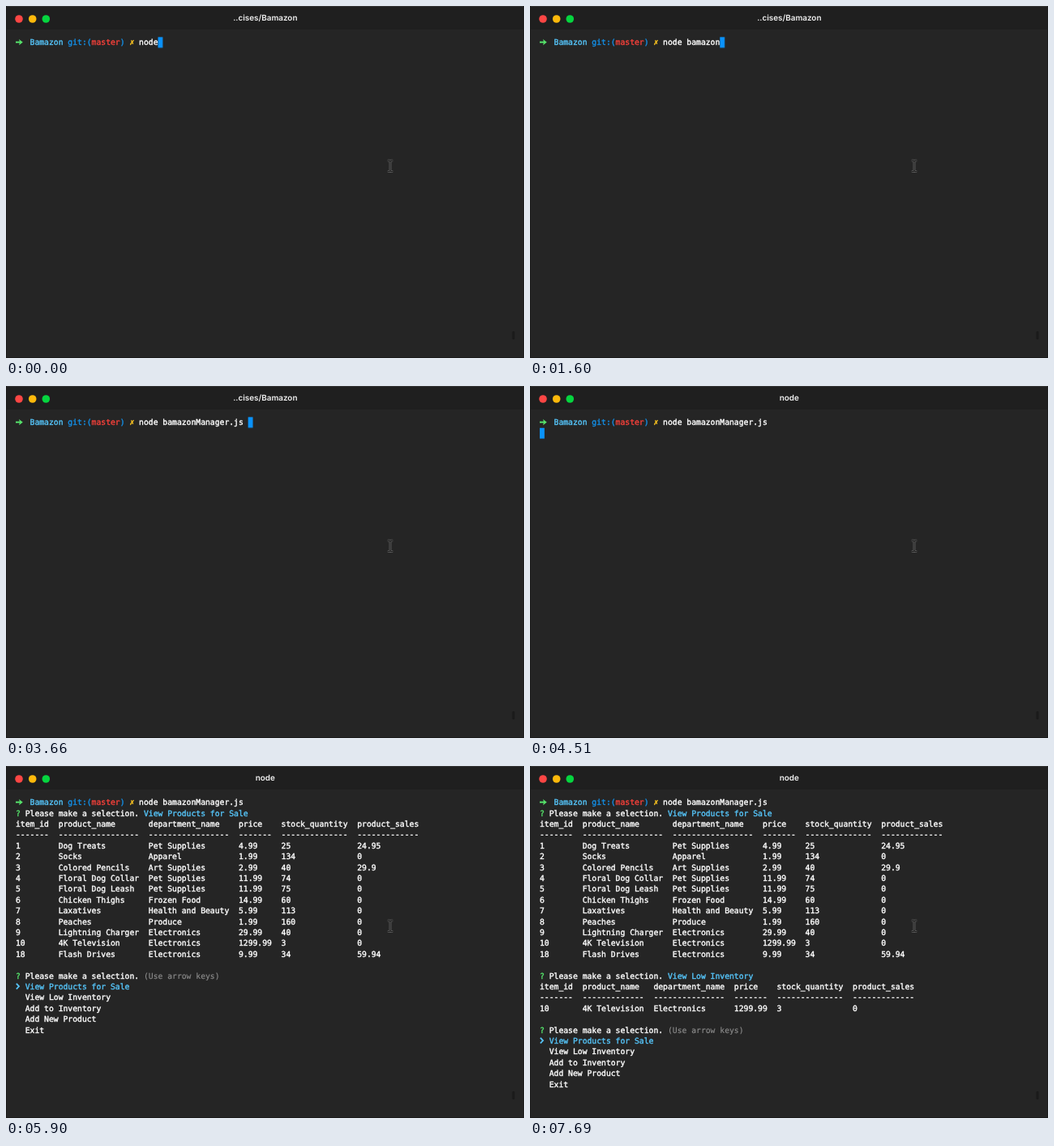
These frames come from a looping animation (639 by 435 pixels, 8000 ms). An HTML page:

```html
<!DOCTYPE html>
<html lang="en">
<head>
<meta charset="utf-8">
<title>Terminal</title>
<style>
  html, body { margin: 0; width: 100%; height: 100%; overflow: hidden; background: #252525; }
  svg { display: block; width: 639px; height: 435px; }
  text {
    font: 9.72px "DejaVu Sans Mono", "DejaVu Sans", monospace;
    stroke-width: .4px;
    white-space: pre;
    text-rendering: geometricPrecision;
  }
  .title { font: 600 9.9px Inter, Roboto, sans-serif; text-anchor: middle; }
  .thin { stroke-width: .15px; }
</style>
</head>
<body>
<svg id="stage" viewBox="0 0 639 435">
  <rect width="639" height="435" fill="#252525"/>
  <rect width="639" height="29" fill="#1f1f1f"/>
  <path d="M0 .5H639" stroke="#343434"/>
  <path d="M.5 0V435M638.5 0V435M0 434.5H639" stroke="#1a1a1a" fill="none"/>
  <circle cx="16" cy="16" r="4.8" fill="#fc4644"/>
  <circle cx="32.7" cy="16" r="4.8" fill="#fdb90b"/>
  <circle cx="49.3" cy="16" r="4.8" fill="#06d53f"/>
  <rect x="624.5" y="402" width="3" height="10" rx="1" fill="#1b1b1b"/>
</svg>
<script>
const LOOP = 8000, X0 = 12, CW = 5.85, Y0 = 48.1, LH = 13.4;
const C = { white: '#fdfdfd', cyan: '#55c3f7', blue: '#138fe6', red: '#f5403a',
            green: '#55e06a', yellow: '#fbc420', grey: '#8c8c8c', cursor: '#0a93fb' };
const stage = document.getElementById('stage');

function add(parent, tag, attrs, content = '') {
  const el = document.createElementNS('http://www.w3.org/2000/svg', tag);
  for (const k in attrs) el.setAttribute(k, attrs[k]);
  el.textContent = content;
  parent.append(el);
  return el;
}

const colX = c => X0 + c * CW;
const rowY = r => Y0 + r * LH;

function put(parent, col, row, str, fill = C.white, cls = '') {
  return add(parent, 'text', { x: colX(col), y: rowY(row), fill, stroke: fill, class: cls }, str);
}

// Plays a list of [time, keyframe] as hard steps
function stepped(el, steps) {
  const frames = steps.map(([t, style]) => ({ ...style, offset: t / LOOP, easing: 'steps(1, end)' }));
  frames.push({ ...steps[steps.length - 1][1], offset: 1 });
  el.animate(frames, { duration: LOOP, iterations: Infinity });
}

function during(el, from, to = LOOP) {
  const steps = [[0, { opacity: from > 0 ? 0 : 1 }]];
  if (from > 0) steps.push([from, { opacity: 1 }]);
  if (to < LOOP) steps.push([to, { opacity: 0 }]);
  stepped(el, steps);
  return el;
}

const layer = (from, to) => during(add(stage, 'g', {}), from, to);

// Window title
for (const [str, from, to] of [['..cises/Bamazon', 0, 4090], ['node', 4090, LOOP]])
  during(add(stage, 'text', { x: 319.8, y: 18.2, fill: '#f2f2f2', class: 'title' }, str), from, to);

// Prompt
add(stage, 'path', { d: 'M12 44.7H17.5', stroke: C.green, 'stroke-width': 2 });
add(stage, 'path', { d: 'M16 40.9L20.8 44.7L16 48.5L17 44.7Z', fill: C.green });
put(stage, 3, 0, 'Bamazon', C.cyan);
put(stage, 11, 0, 'git:(', C.blue);
put(stage, 16, 0, 'master', C.red);
put(stage, 22, 0, ')', C.blue);
put(stage, 24, 0, '✗', C.yellow);

// Typed command: [time, characters so far]
const command = 'node bamazonManager.js ';
const typing = [[0, 4], [430, 5], [860, 6], [1000, 7], [1150, 9], [1450, 10], [1600, 12],
                [2860, 13], [3240, 14], [3370, 15], [3660, 23]];
const at = (col, row, opacity = 1) =>
  ({ transform: `translate(${colX(col)}px, ${38.4 + row * LH}px)`, opacity });

let typed = 0;
for (const [t, n] of typing) {
  during(put(stage, 26 + typed, 0, command.slice(typed, n)), t);
  typed = n;
}
stepped(add(stage, 'rect', { width: CW, height: 13.2, fill: C.cursor }), [
  ...typing.map(([t, n]) => [t, at(26 + n, 0)]),
  [4090, at(0, 1)], [4910, at(0, 1, 0)],
  [7550, at(0, 17)], [7690, at(0, 17, 0)]
]);

// Menu
const choices = ['View Products for Sale', 'View Low Inventory', 'Add to Inventory',
                 'Add New Product', 'Exit'];

function ask(g, row) {
  put(g, 0, row, '?', C.green);
  put(g, 2, row, 'Please make a selection.');
}

function menu(row, picked, hint, from, to) {
  const g = layer(from, to);
  ask(g, row);
  if (hint) put(g, 27, row, '(Use arrow keys)', C.grey, 'thin');
  choices.forEach((c, i) => put(g, 2, row + 1 + i, c, i === picked ? C.cyan : C.white));
  const y = rowY(row + 1 + picked) - 3.6;
  add(g, 'path', { d: `M12.8 ${y - 3.4}L16 ${y}L12.8 ${y + 3.4}`, fill: 'none',
                   stroke: C.cyan, 'stroke-width': 1.8 });
}

function answer(row, choice, from) {
  const g = layer(from);
  ask(g, row);
  put(g, 27, row, choices[choice], C.cyan);
}

// Tables, columns as wide as their longest cell
const heads = ['item_id', 'product_name', 'department_name', 'price', 'stock_quantity', 'product_sales'];
const items = `1|Dog Treats|Pet Supplies|4.99|25|24.95
2|Socks|Apparel|1.99|134|0
3|Colored Pencils|Art Supplies|2.99|40|29.9
4|Floral Dog Collar|Pet Supplies|11.99|74|0
5|Floral Dog Leash|Pet Supplies|11.99|75|0
6|Chicken Thighs|Frozen Food|14.99|60|0
7|Laxatives|Health and Beauty|5.99|113|0
8|Peaches|Produce|1.99|160|0
9|Lightning Charger|Electronics|29.99|40|0
10|4K Television|Electronics|1299.99|3|0
18|Flash Drives|Electronics|9.99|34|59.94`.split('\n').map(line => line.split('|'));

function table(row, data, from) {
  const g = layer(from);
  let col = 0;
  heads.forEach((head, i) => {
    const cells = data.map(d => d[i]);
    const width = Math.max(head.length, ...cells.map(c => c.length));
    [head, '-'.repeat(width), ...cells].forEach((c, j) => put(g, col, row + j, c));
    col += width + 2;
  });
}

menu(1, 0, true, 5050, 5900);
answer(1, 0, 5900);
table(2, items, 5900);
menu(16, 0, true, 5900, 7270);
menu(16, 1, false, 7270, 7550);
answer(16, 1, 7550);
table(17, items.filter(d => d[4] < 5), 7690);
menu(21, 0, true, 7690, LOOP);

// Mouse pointer
const beam = 'M470.8 191H473L474 192L475 191H477.2M474 192V203.5M470.8 204.5H473L474 203.5L475 204.5H477.2';
add(stage, 'path', { d: beam, fill: 'none', stroke: '#767676', 'stroke-width': 2.6 });
add(stage, 'path', { d: beam, fill: 'none', stroke: '#202020', 'stroke-width': 1.3 });
</script>
</body>
</html>
```
